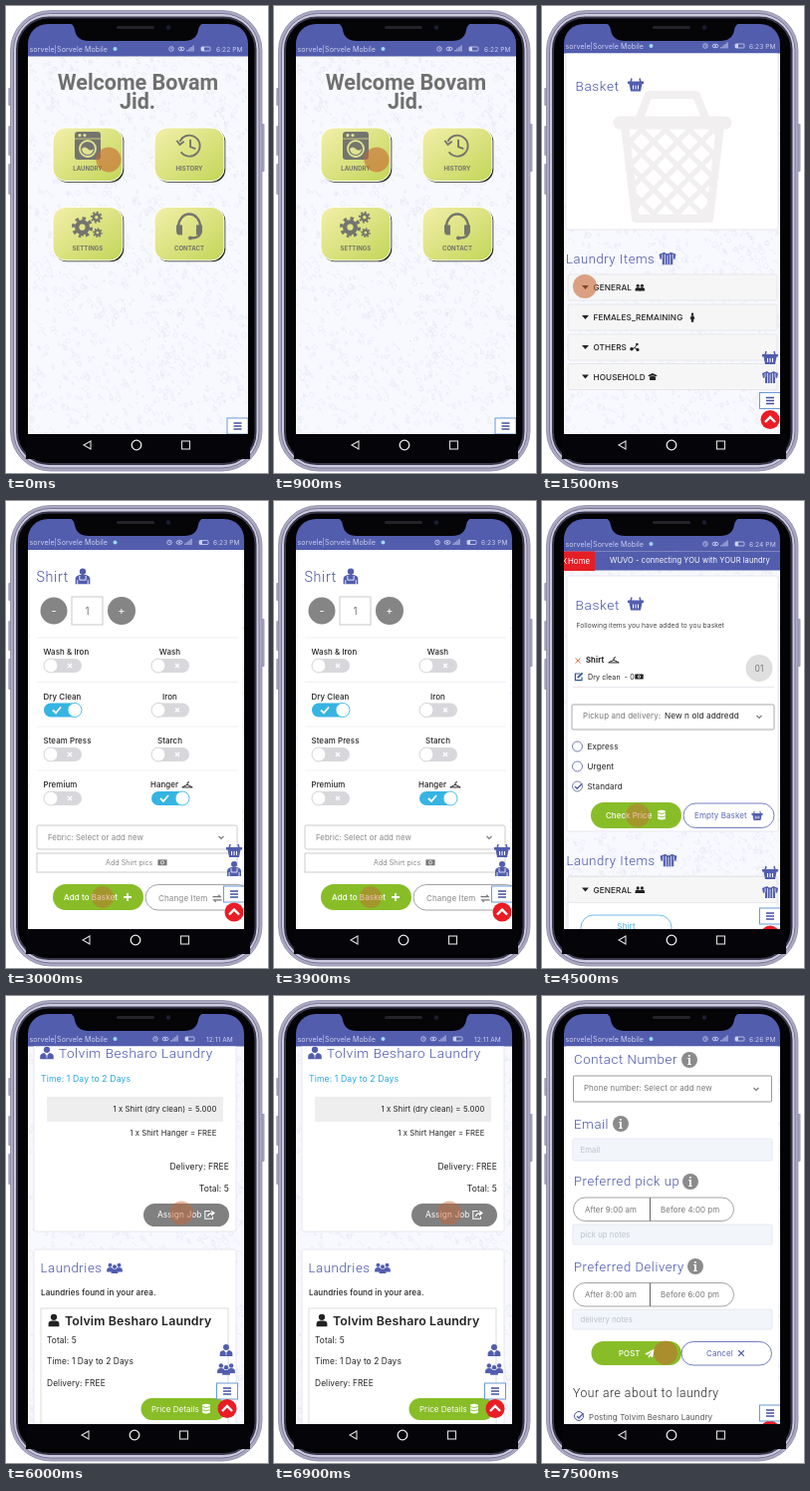
These frames come from a looping animation (263 by 468 pixels, 9 s). An HTML page:

```html
<!DOCTYPE html>
<html lang="en">
<head>
<meta charset="utf-8">
<title>Laundry app walkthrough</title>
<style>
  html, body { margin: 0; width: 100%; height: 100%; overflow: hidden; background: #fff; }
  svg { display: block; width: 263px; height: 468px; }
  text { font-family: Inter, sans-serif; letter-spacing: .01em; white-space: pre; }
  .heading { font-family: Roboto, sans-serif; font-weight: 300; letter-spacing: .045em; }
  .welcome { font-family: Roboto, sans-serif; font-weight: 700; letter-spacing: 0; }
  .info { font-family: 'Noto Serif', serif; font-weight: 700; }
</style>
</head>
<body>
<svg id="stage" viewBox="0 0 263 468"></svg>
<script>
const INDIGO = '#525dad', GREEN = '#88bd28', GRAY = '#808080', INK = '#222', PALE = '#d8d8dc';
const SCREEN_MS = 1500;

// Basic shapes
const text = (x, y, size, str, fill = INK, more = '') =>
  `<text x="${x}" y="${y}" font-size="${size}" fill="${fill}" ${more}>${str}</text>`;
const MID = 'text-anchor="middle"', END = 'text-anchor="end"', MEDIUM = 'font-weight="500"', BOLD = 'font-weight="700"';
const box = (x1, y1, x2, y2, fill, stroke = 'none', r = 0, w = 1) =>
  `<rect x="${x1}" y="${y1}" width="${x2 - x1}" height="${y2 - y1}" rx="${r}" fill="${fill}" stroke="${stroke}" stroke-width="${w}"/>`;
const disc = (x, y, r, fill, stroke = 'none', w = 1) =>
  `<circle cx="${x}" cy="${y}" r="${r}" fill="${fill}" stroke="${stroke}" stroke-width="${w}"/>`;
const line = (d, stroke, w = 1) =>
  `<path d="${d}" fill="none" stroke="${stroke}" stroke-width="${w}"/>`;
const solid = (d, fill = 'currentColor') => `<path d="${d}" fill="${fill}"/>`;
const stroke = (d, w = 1.5) => line(d, 'currentColor', w);
const dot = (x, y, r) => disc(x, y, r, 'currentColor');
const gear = (x, y, r) => disc(x, y, r * .6, 'none', 'currentColor', r * .5) +
  `<circle cx="${x}" cy="${y}" r="${r}" fill="none" stroke="currentColor" stroke-width="${r * .4}" pathLength="16" stroke-dasharray="1"/>`;

// Icons are centred on 0,0 and about 16 units wide
const person = x => dot(x, -3, 2.6) + solid(`M${x - 4.5} 6v-2q0-4 4.5-4t4.5 4v2z`);
const ICONS = {
  basket: stroke('M-5-2l1-4M5-2l-1-4') + solid('M-8-3H8V-.5H6.5L5 7H-5L-6.5-.5H-8z') +
    line('M-2.5 1v4M0 1v4M2.5 1v4', '#fff', 1),
  shirt: solid('M-3-6L-8-4-7 1-5 0V6H5V0L7 1 8-4 3-6Q0-3-3-6z') +
    line('M-2.5-4V6M0-3V6M2.5-4V6M-5-4V0M5-4V0', '#fff', .7),
  worker: dot(0, -5, 3) + solid('M-7 7V2q0-3 4-4h6q4 1 4 4v5z') + line('M-3-1v4h6v-4M-5 7V3M5 7V3', '#fff', .8),
  manager: dot(0, -3.5, 3.5) + solid('M-7.5 7V4q0-3 4.5-4L0 3 3 0q4.5 1 4.5 4v3z') + line('M0 1v5', '#fff', .8),
  person: dot(0, -3.5, 3.5) + solid('M-6 7V4q0-3.5 4-3.5h4q4 0 4 3.5v3z'),
  pair: person(-3) + person(4),
  group: person(-6) + person(6) + '<g transform="translate(0 2)">' + person(0) + '</g>',
  woman: dot(0, -5.5, 2) + solid('M-2-3h4l2 6h-2v5h-4v-5h-2z'),
  nodes: dot(-5, 3, 3) + dot(4, -5, 2) + dot(5, 4, 2.6) + stroke('M-5 3L0 1 4-5M0 1L5 4'),
  crate: solid('M-8-2L0-6 8-2 5 0V6H-5V0z') + line('M-5 0L0-2 5 0', '#fff', .8),
  hanger: stroke('M0-1v-3q3 0 2-2M0-1L-8 3H8z', 1.5),
  camera: solid('M-7-4h14v9h-14z') + disc(0, .5, 2.5, 'none', '#fff', 1.2),
  cash: solid('M-7-4h14v8h-14z') + disc(0, 0, 2, 'none', '#fff', 1.4),
  coins: solid('M-6-6q6-3 12 0v12q-6 3-12 0z') + line('M-6-3q6 3 12 0M-6 2q6 3 12 0', GREEN, 1.3),
  plus: stroke('M-6 0H6M0-6V6', 3),
  swap: stroke('M-7-2H5L2-5M7 3H-5l3 3', 1.8),
  share: stroke('M1-5h-7V6H5V3', 1.5) + stroke('M-2 3q0-5 8-5M3-5l4 3-4 3', 1.8),
  plane: solid('M8-7L-8 1l4 2L5-4-2 4v4l3-3 4 2z'),
  edit: stroke('M2-5h-8V6H5V1', 2) + stroke('M-2 2L6-6', 3),
  cross: stroke('M-5-5L5 5M5-5L-5 5', 2),
  washer: box(-13, -14, 13, 14, 'currentColor', 'none', 3) + line('M-13-7H13', '#d7dc84', .8) +
    disc(-8, -10.5, 1.5, '#e5e6a0') + disc(-3, -10.5, 1.5, '#e5e6a0') +
    disc(0, 3, 8, 'none', '#e0e392', 1.8) + solid('M-6 3q3-3 6 0t6 0a6 6 0 0 1-12 0z', '#e0e392'),
  history: stroke('M-9-4A10 10 0 1 1-8 6M-12-5l3 4 4-3M1-6v7l5 2', 1.8),
  gears: gear(-5, 2, 8) + gear(8, -7, 4.5) + gear(9, 7, 3.7),
  headset: stroke('M-11 2A11 13 0 0 1 11 2M11 7q0 6-9 6', 2.3) +
    solid('M-13 0h6v10h-3q-3 0-3-4zM13 0H7v10h3q3 0 3-4z') + dot(1, 13, 2),
};
const icon = (name, x, y, scale = 1, color = INDIGO) =>
  `<g transform="translate(${x} ${y}) scale(${scale})" color="${color}">${ICONS[name]}</g>`;

// Interface parts
const pill = (x1, y1, x2, y2, fill, edge) => box(x1, y1, x2, y2, fill, edge, (y2 - y1) / 2, .9);
const tap = (x, y, r = 12, alpha = .58) => `<g opacity="${alpha}">${disc(x, y, r, '#c96230')}</g>`;
const chevron = (x, y) => line(`M${x - 2.5} ${y - 1}l2.5 2.5 2.5-2.5`, '#777', 1.1);
const heading = (x, y, str, size = 13.2, fill = '#4450a8') => text(x, y, size, str, fill, 'class="heading"');
const card = (x1, y1, x2, y2, fill = '#fff') => box(x1, y1, x2, y2, fill, '#e2e2ea', 2, .8);
const menu = (x, y) => box(x - 10.5, y - 8, x + 10.5, y + 8, '#fff', '#6b9ad8') +
  line(`M${x - 4} ${y - 3}h8m-8 3h8m-8 3h8`, '#4450a0', 1.5);
const toTop = (x, y) => disc(x, y, 9.5, '#ea1c24') + line(`M${x - 5} ${y + 2.5}l5-5 5 5`, '#fff', 2.4);
const info = (x, y) => disc(x, y, 8, '#8b8b8b') + text(x, y + 4.5, 12.5, 'i', '#fff', `${MID} class="info"`);
const section = (y, label) => card(26, y, 236, y + 26, '#f6f6f7') +
  solid(`M40 ${y + 11}h7l-3.5 4z`, INK) + text(51.5, y + 16.2, 8.2, label, INK, MEDIUM);

function statusBar(y, time, iconX, timeX, right) {
  const u = y - 2.5, tint = '#ccd0f2';
  return box(22, 18, right, 60, INDIGO, 'none', 20) + box(22, 40, right, 60, INDIGO) +
    solid('M60 16q8 1 9 8 2 11 14 11H179q12 0 14-11 1-7 9-8z', '#050508') +
    text(23.5, y, 7.1, 'sorvele|Sorvele Mobile', tint) + disc(109.5, u, 2, '#9bd8ff') +
    disc(iconX + 2, u, 2.3, 'none', tint, .8) + line(`M${iconX + 2} ${u - 1.3}v1.5h1.2`, tint, .7) +
    `<ellipse cx="${iconX + 12}" cy="${u}" rx="3" ry="1.8" fill="none" stroke="${tint}" stroke-width=".9"/>` + disc(iconX + 12, u, .9, tint) +
    line(`M${iconX + 18} ${y}v-1.5m2 1.5v-3m2 3v-4.5m2 4.5v-6`, tint, 1) +
    box(iconX + 32, u - 2, iconX + 41, u + 2, 'none', tint, .8, .8) + box(iconX + 32, u - 2, iconX + 35, u + 2, tint) +
    text(timeX, y, 6.6, time, tint);
}

function navBar(x) {
  return box(20, 429, 245, 454, '#050409') + line(`M${x - 46} 436v8l-7-4z`, '#ddd', 1.1) +
    disc(x, 440, 4.8, 'none', '#eee', 1.3) + box(x + 45.5, 436, x + 53.5, 444, 'none', '#ddd', 0, 1.1);
}

function doodles() {
  let seed = 7, d = '';
  const rnd = n => (seed = seed * 16807 % 2147483647) / 2147483647 * n;
  for (let i = 0; i < 1300; i++) {
    const x = (22 + rnd(220)).toFixed(1), y = (50 + rnd(378)).toFixed(1), r = (.7 + rnd(2)).toFixed(1);
    d += `M${x} ${y}` + [`a${r} ${r} 0 1 1 0 .1`, `q${r} ${-2 * r} ${2 * r} 0t${r} ${r}`, `l${r} ${r}v${r}h${-r}z`][i % 3];
  }
  return line(d, '#e5e6f1', .6);
}

function phone() {
  const key = (x, y1, y2) => box(x, y1, x + 4, y2, '#a3a1b8', 'none', 1);
  return key(2.3, 82, 100) + key(2.3, 120, 150) + key(2.3, 158, 189) + key(255.5, 118, 166) +
    box(4.5, 4.5, 257, 466, '#aaa8c3', '#8e8ca8', 40, .8) + box(7.5, 7.5, 254, 463, '#cdcbe2', '#77758e', 37) +
    box(11, 11.5, 250.5, 459, '#030306', '#3a394c', 32, 2);
}
const speaker = box(111, 20, 149, 23, '#23232b', 'none', 1.5) + disc(163, 21.5, 2.3, '#1a1e30');

// Screens
function home() {
  const tile = (x, y, name, label, scale) => box(x + 1.3, y + 1.3, x + 71.3, y + 54.8, '#25281c', 'none', 13) +
    box(x, y, x + 70, y + 53.5, 'url(#lime)', '#fff', 13) + icon(name, x + 35, y + 18, scale, '#74756e') +
    text(x + 35, y + 43, 6, label, '#72736a', `${MID} ${BOLD}`);
  const title = `${MID} class="welcome"`;
  return text(132.5, 84, 21.5, 'Welcome Bovam', '#707070', title) + text(132, 102.5, 21.5, 'Jid.', '#707070', title) +
    tile(47, 122, 'washer', 'LAUNDRY', 1) + tile(149, 122, 'history', 'HISTORY', 1.05) +
    tile(47, 201.5, 'gears', 'SETTINGS', 1.1) + tile(149, 201.5, 'headset', 'CONTACT', 1) +
    tap(103, 154, 12.5) + menu(232.5, 421);
}

function items() {
  let weave = '';
  for (let x = -20; x < 290; x += 24) weave += `M${x} 124l90 90M${x} 124l-90 90`;
  const bigBasket = `<clipPath id="bowl"><path d="M80 120h102l-11 95H91z"/></clipPath>
    <g fill="none" stroke="#f1eff0" stroke-width="8" stroke-linejoin="round"><g clip-path="url(#bowl)">${line(weave, '#f1eff0', 5)}</g>
    <path d="M83 120l11 93h74l11-93M98 112l9-23h48l9 23"/><path d="M78 117h106" stroke-width="13" stroke-linecap="round"/></g>`;
  return card(24, 47, 237, 224) + bigBasket + heading(33.5, 84.5, 'Basket', 13.6) + icon('basket', 94, 78.5, 1) +
    heading(24, 258, 'Laundry Items', 13) + icon('shirt', 126, 253, 1.05) +
    section(269, 'GENERAL') + icon('pair', 98, 282, .6, INK) +
    section(299, 'FEMALES_REMAINING') + icon('woman', 151, 312, .6, INK) +
    section(329, 'OTHERS') + icon('nodes', 93, 342, .6, INK) +
    section(358.5, 'HOUSEHOLD') + icon('crate', 111, 371.5, .6, INK) +
    icon('basket', 229, 352) + icon('shirt', 229, 372) + menu(229, 395.5) + toTop(229, 414.5) + tap(43, 281);
}

function options() {
  const toggle = (x, y, on) => box(x, y - 7, x + 38, y + 7, on ? '#36b4e2' : PALE, 'none', 7) +
    disc(x + (on ? 31 : 7), y, 7, '#fff', on ? '#36b4e2' : '#ccc', .8) +
    (on ? line(`M${x + 9} ${y}l3 3 5-6`, '#fff', 1.8) : line(`M${x + 24} ${y - 2}l4 4m0-4l-4 4`, '#fff', 1.3));
  const row = (y, left, right, leftOn, rightOn) => text(37.5, y, 7.9, left, INK, MEDIUM) +
    text(right === 'Hanger' ? 159 : 164.5, y, 7.9, right, INK, `${MID} ${MEDIUM}`) +
    toggle(38, y + 11, leftOn) + toggle(146, y + 11, rightOn) + line(`M31 ${y - 17}h202`, '#ececf0', .8);
  return box(24, 48, 237, 429, '#fff') + heading(30.5, 81, 'Shirt', 14.3) + icon('worker', 77, 76, 1.05) +
    disc(48, 110, 13.5, '#858585') + disc(116, 110, 14, '#858585') + box(66, 96, 97, 124, '#fff', '#c9c9c9') +
    text(48, 113.5, 11, '-', '#fff', MID) + text(81.5, 113.5, 10, '1', '#777', MID) + text(116, 113.7, 11, '+', '#fff', MID) +
    row(154, 'Wash &amp; Iron', 'Wash') + row(198.5, 'Dry Clean', 'Iron', true) +
    row(243, 'Steam Press', 'Starch') + row(287, 'Premium', 'Hanger', false, true) + icon('hanger', 182, 285, .65, INK) +
    box(31, 325, 232, 349, '#fff', '#ccc', 2) + text(42, 339.5, 7.8, 'Febric: Select or add new', '#888') + chevron(216, 337) +
    box(31, 353, 232, 372, '#fff', '#ccc') + text(100, 365, 7, 'Add Shirt pics', '#888') + icon('camera', 157, 362, .65, '#777') +
    pill(47, 384, 138, 410, GREEN) + text(58, 400, 8, 'Add to Basket', '#fff', MEDIUM) + icon('plus', 122, 397, .65, '#fff') +
    pill(140, 384.5, 246, 410, '#fff', '#999') + text(153, 401, 8.1, 'Change Item', '#888') + icon('swap', 212, 398, .65, '#777') +
    tap(97, 397, 11, .42) + icon('basket', 229, 350) + icon('worker', 229, 369) + menu(229, 394) + toTop(229, 412);
}

function basket() {
  const choice = (y, label) => disc(35.5, y, 5, '#fff', '#6870a8', .9) + text(45.5, y + 3, 8.1, label);
  return box(22, 49, 239, 69.5, INDIGO) + box(22, 50, 53, 70, '#e61e25') + line('M24.5 57l-2 3 2 3', '#fff', 1) +
    text(26, 62.5, 7.8, 'Home', '#fff') + text(68, 62.3, 7.5, 'WUVO - connecting YOU with YOUR laundry', '#fff') +
    card(25, 75, 237, 331) + heading(33.5, 109, 'Basket', 13.7) + icon('basket', 94, 102.5, 1) +
    text(34.5, 127, 6.7, 'Following items you have added to you basket', '#444') +
    icon('cross', 36, 160, .5, '#ed7b52') + text(44, 162.2, 7.7, 'Shirt', INK, BOLD) + icon('hanger', 72, 160, .65, INK) +
    icon('edit', 37, 176, .6, '#31579a') + text(46, 178.5, 7.1, 'Dry clean  - 0') + icon('cash', 97.5, 176, .6, INK) +
    disc(218, 167.5, 13.5, '#dfdfdf') + text(218, 170.5, 8.5, '01', '#777', MID) + line('M31 186.5h202', '#e7e7ec') +
    box(30, 204, 233, 229, '#fff', '#aaa', 1) + text(41, 218.2, 8, 'Pickup and delivery:', '#777') +
    text(123, 218.2, 8.2, 'New n old addredd') + chevron(218, 216) +
    choice(246, 'Express') + choice(266, 'Urgent') + choice(286, 'Standard') + line('M33 286l2.2 2.2 5-5', INDIGO, 1.4) +
    pill(49, 302, 140, 328, GREEN) + text(64, 317.5, 7.9, 'Check Price', '#fff', MEDIUM) + icon('coins', 120, 314.5, .65, '#fff') +
    pill(142, 303, 233, 327.5, '#fff', '#6571bd') + text(153, 318, 8, 'Empty Basket', '#5966b5') + icon('basket', 216, 315, .7) +
    tap(96, 315, 12, .42) + heading(24.5, 365, 'Laundry Items', 13) + icon('shirt', 127, 360, 1.05) +
    card(26, 376, 236, 432) + section(376.5, 'GENERAL') + icon('pair', 98, 389.5, .6, INK) +
    pill(39, 415, 130, 440, '#fff', '#5cb8e4') + text(84.5, 429, 8.2, 'Shirt', '#47aee0', MID) +
    icon('basket', 229, 372) + icon('shirt', 229, 392) + toTop(229, 435) + menu(229, 416);
}

function quote() {
  return card(28, 44, 231, 236) + heading(53, 62, 'Tolvim Besharo Laundry', 13.4) + icon('manager', 41, 57, .9) +
    text(35, 86, 8.7, 'Time: 1 Day to 2 Days', '#2ba7da') + box(41, 101, 218, 126, '#eeeeef') +
    text(211.5, 116, 7.8, '1 x Shirt (dry clean) = 5.000', INK, END) + text(211.5, 140, 7.7, '1 x Shirt Hanger = FREE', INK, END) +
    text(224, 174, 8.5, 'Delivery: FREE', INK, END) + text(224, 196, 8.5, 'Total: 5', INK, END) +
    pill(138, 208, 224, 231, GRAY) + text(152, 222.3, 8.3, 'Assign Job', '#fff') + icon('share', 204, 219, .7, '#fff') +
    tap(176, 217.5, 12, .45) + card(28, 254, 231, 432) + heading(34.5, 277, 'Laundries') + icon('group', 109, 272, .75) +
    text(35, 300, 8.1, 'Laundries found in your area.', INK, MEDIUM) + box(35, 313, 223, 440, '#fff', '#ddd') +
    icon('person', 48, 325, .9, INK) + text(59, 330, 12.4, 'Tolvim Besharo Laundry', INK, 'font-weight="600"') +
    text(41, 347.5, 8.4, 'Total: 5') + text(41, 369, 8.4, 'Time: 1 Day to 2 Days') + text(41, 390.5, 8.4, 'Delivery: FREE') +
    pill(135.5, 403, 221, 425, GREEN) + text(146, 416.5, 7.9, 'Price Details', '#fff') + icon('coins', 201, 413.5, .65, '#fff') +
    icon('manager', 221, 355, .85) + icon('group', 221, 373, .85) + menu(222, 396) + toTop(222, 413.5);
}

function booking() {
  const input = (y1, y2, hint) => box(31, y1, 231, y2, '#f2f5fa', '#e0e6ee', 1, .8) + text(38.5, (y1 + y2) / 2 + 2.8, 7.7, hint, '#bcc2cb');
  const times = (y, from, to) => pill(31.5, y, 192.5, y + 23.5, '#fff', '#999') + line(`M108.5 ${y}v23.5`, '#666') +
    text(43, y + 14.7, 7.9, from, '#777') + text(119, y + 14.7, 7.9, to, '#777');
  return box(24, 49, 237, 429, '#fff') + heading(32, 68, 'Contact Number') + info(148, 64) +
    box(31.5, 80, 230.5, 106, '#fff', '#999', 1) + text(42, 95, 7.9, 'Phone number: Select or add new', '#777') + chevron(215, 93) +
    heading(32, 133, 'Email') + info(79, 128) + input(143, 165, 'Email') +
    heading(32, 190, 'Preferred pick up', 13) + info(149, 186) + times(202, 'After 9:00 am', 'Before 4:00 pm') + input(229, 249, 'pick up notes') +
    heading(32, 275.5, 'Preferred Delivery', 13) + info(154, 271) + times(287.5, 'After 8:00 am', 'Before 6:00 pm') + input(314, 334, 'delivery notes') +
    pill(49.5, 346, 140, 370, GREEN) + text(77, 361, 7.8, 'POST', '#fff', MEDIUM) + icon('plane', 108, 358, .6, '#fff') +
    pill(140, 346.5, 230.5, 370, '#fff', '#6571bd') + text(165, 361, 8, 'Cancel', '#5966b5') + icon('cross', 200, 358, .55) +
    tap(124, 357.5, 12, .52) + heading(31, 402, 'Your are about to laundry', 12.1, INK) +
    disc(37, 421, 4.5, 'none', '#4c558c') + line('M35 421l2 2 4.5-5', INDIGO, 1.4) +
    text(47, 425, 8, 'Posting Tolvim Besharo Laundry', '#555') + toTop(229, 435) + menu(229, 418);
}

// [content, status baseline, clock, status icons x, clock x, right edge, nav centre]
const SCREENS = [
  [home, 45.5, '6:22 PM', 164, 211, 243, 131],
  [items, 42.5, '6:23 PM', 162, 208, 239, 130],
  [options, 44, '6:23 PM', 162, 208, 239, 130],
  [basket, 45.5, '6:24 PM', 162, 208, 239, 130],
  [quote, 45.5, '12:11 AM', 148, 201, 239, 129],
  [booking, 45.5, '6:26 PM', 162, 208, 239, 130],
];
const stage = document.getElementById('stage');
const pattern = doodles();
const pictures = SCREENS.map(([content, y, clock, iconX, clockX, right, navX]) =>
  `<defs><linearGradient id="lime" x2="1" y2="1"><stop stop-color="#f3efaa"/><stop offset="1" stop-color="#c3d658"/></linearGradient>
  <clipPath id="glass"><rect x="22" y="${y + 5}" width="${right - 22}" height="${425 - y}"/></clipPath></defs>` +
  phone() + statusBar(y, clock, iconX, clockX, right) + speaker +
  `<g clip-path="url(#glass)">${box(22, y, right, 429, '#f8f9fe')}${pattern}${content()}</g>` + navBar(navX));

let shown = -1;
function draw(now) {
  const index = Math.floor(now / SCREEN_MS) % pictures.length;
  if (index !== shown) stage.innerHTML = pictures[shown = index];
  requestAnimationFrame(draw);
}
draw(performance.now());
</script>
</body>
</html>
```
